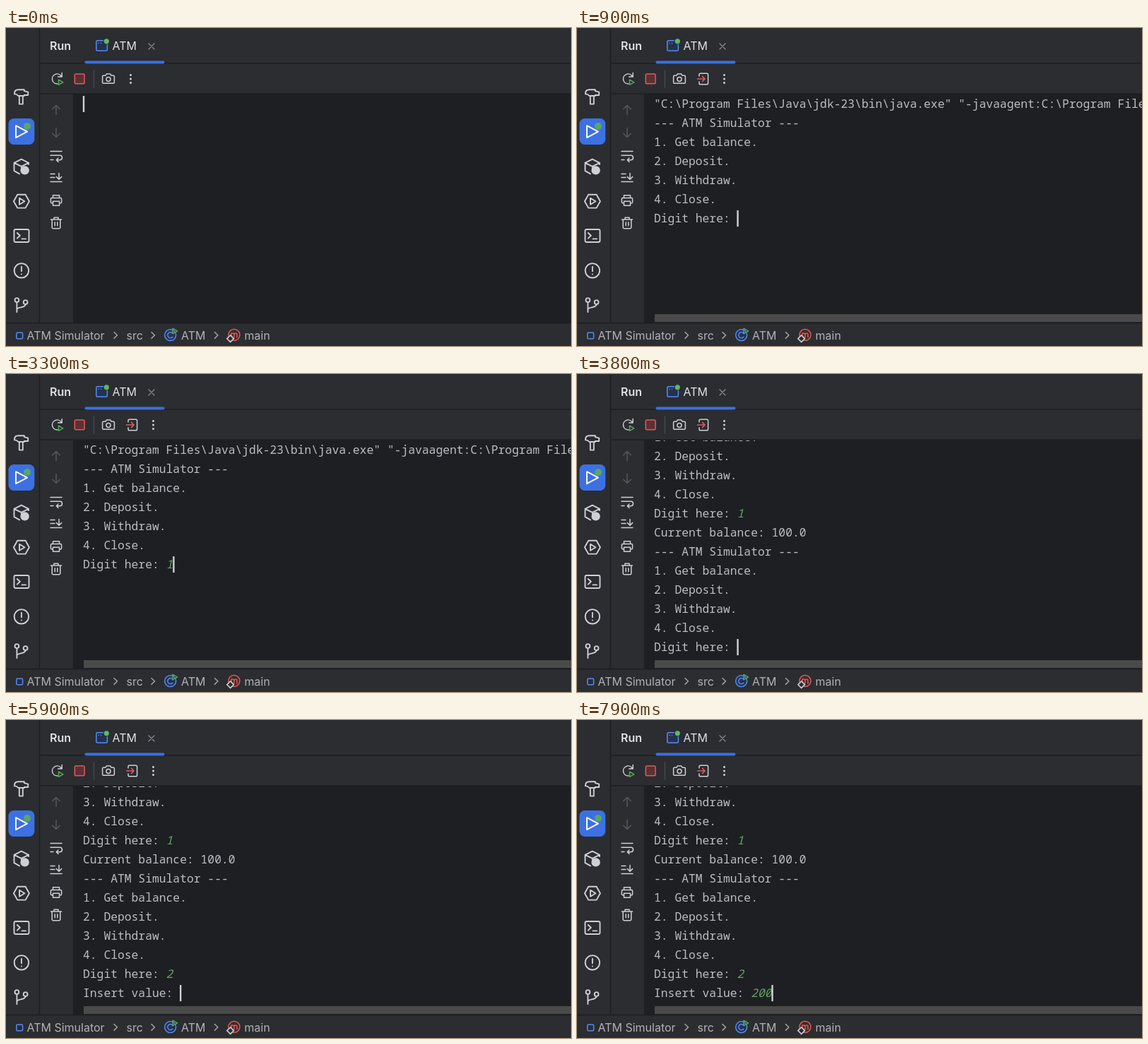
An HTML page that plays this animation: 800 by 450 pixels, repeating every 8 s.

```html
<!DOCTYPE html>
<html lang="en">
<head>
<meta charset="utf-8">
<title>ATM Simulator</title>
<style>
  html, body { margin: 0; width: 100%; height: 100%; overflow: hidden; background: #1e1f22; }
  svg { display: block; width: 100vw; height: 100vh; }
  .ui { font: 16px Inter, sans-serif; fill: #dfe1e5; }
  .crumb { fill: #b0b2b8; }
  #lines { font: 16.33px "Noto Sans Mono", monospace; fill: #bcbec4; white-space: pre; }
  #lines .in { fill: #62a466; font-style: italic; }
  .icon { fill: none; stroke: #ced0d6; stroke-width: 1.9; stroke-linejoin: round; stroke-linecap: round; }
  .thin { stroke-width: 1.5; }
  .dim { stroke: #56585d; }
  .red { stroke: #db5c5c; }
  .blue { stroke: #548af7; }
  .green { stroke: #57a65c; }
</style>
</head>
<body>
<svg viewBox="0 0 800 450">
  <defs>
    <clipPath id="view"><rect x="95" y="94" width="705" height="323"/></clipPath>
  </defs>

  <rect width="800" height="450" fill="#2b2d30"/>
  <rect x="95" y="93" width="705" height="324" fill="#1e1f22"/>
  <path d="M47.5 0V417M48 50H800M48 93H800M0 417.5H800" stroke="#1e1f22" stroke-width="1.4"/>

  <!-- console -->
  <g clip-path="url(#view)">
    <g id="lines"></g>
    <rect id="caret" width="2.4" height="23" fill="#ced0d6"/>
    <rect id="bar" x="110" y="405" width="690" height="11" fill="#4a4a4b"/>
  </g>

  <!-- tab row -->
  <text class="ui" x="62" y="31" font-weight="600" style="font-weight:600">Run</text>
  <g class="icon thin blue">
    <rect x="127.8" y="17.8" width="15.6" height="14.4" rx="2" fill="#25324d"/>
    <path d="M131 21.5h.1M134.5 21.5h.1"/>
  </g>
  <circle cx="142.3" cy="18.8" r="4.6" fill="#2b2d30"/>
  <circle cx="142.3" cy="18.8" r="3.6" fill="#5fb865"/>
  <text class="ui" x="150.5" y="31">ATM</text>
  <path class="icon" style="stroke:#868a91;stroke-width:1.3" d="M202 22l8 8M210 22l-8 8"/>
  <rect x="111.5" y="46.6" width="113" height="3.8" rx="1.9" fill="#3a70e0"/>

  <!-- tool row -->
  <g class="icon thin">
    <path d="M78.4 68.3A7 7 0 1 0 73 79M79.2 63.5V69H73.7"/>
    <path class="green" fill="#253627" d="M74.5 73.2l6.3 3.6-6.3 3.6z"/>
    <rect class="red" x="97.3" y="65" width="13.8" height="13.8" rx="1.8" fill="#5e3034"/>
    <path style="stroke:#46484d" d="M124.5 60V84"/>
    <path d="M138 67.3h2.8l1.6-2.4h5.2l1.6 2.4h2.8a1.4 1.4 0 0 1 1.4 1.4v8.2a1.4 1.4 0 0 1-1.4 1.4h-14a1.4 1.4 0 0 1-1.4-1.4v-8.2a1.4 1.4 0 0 1 1.4-1.4z"/>
    <circle cx="145" cy="72.6" r="3"/>
  </g>
  <g id="exit" class="icon thin">
    <path d="M173 68V66a1.8 1.8 0 0 1 1.8-1.8h9a1.8 1.8 0 0 1 1.8 1.8v12a1.8 1.8 0 0 1-1.8 1.8h-9A1.8 1.8 0 0 1 173 78v-2"/>
    <path class="red" d="M170.5 72H181M177.5 68.4l3.6 3.6-3.6 3.6"/>
  </g>
  <g id="more" fill="#ced0d6">
    <circle cy="66.5" r="1.5"/><circle cy="72" r="1.5"/><circle cy="77.5" r="1.5"/>
  </g>

  <!-- console buttons -->
  <g class="icon thin">
    <path class="dim" d="M71 122.5V109.5M65.7 114.8l5.3-5.3 5.3 5.3"/>
    <path class="dim" d="M71 141.5V154.5M65.7 149.2l5.3 5.3 5.3-5.3"/>
    <path d="M63 174.5H79M63 180.3H76.3a3.2 3.2 0 0 1 0 6.4H71.5M74 184l-2.7 2.7 2.7 2.7M63 186.5H67"/>
    <path d="M63 206.5H69M63 211.5H69M63 217.5H79M75 205.5V214M71.4 210.6l3.6 3.6 3.6-3.6"/>
    <path d="M66.5 240.5V236.8h9V240.5M66.5 247.8H64.8a1.4 1.4 0 0 1-1.4-1.4V242a1.4 1.4 0 0 1 1.4-1.4H77.2a1.4 1.4 0 0 1 1.4 1.4v4.4a1.4 1.4 0 0 1-1.4 1.4H75.5M66.5 245.2h9v6h-9z"/>
    <path d="M63.5 271H78.5M68 271V268.2h6V271M65.2 271V282a1.8 1.8 0 0 0 1.8 1.8h8a1.8 1.8 0 0 0 1.8-1.8V271M69.2 274.8v5M72.8 274.8v5"/>
  </g>

  <!-- side bar -->
  <rect x="3.5" y="128" width="36.8" height="37" rx="7.5" fill="#3d70e2"/>
  <g class="icon">
    <path d="M12 92.4c0-3.4 2.2-5.2 5.6-5.2h8.2v2l5.4 1.4v4.4h-5.4v1H17.4c-1.6-2-3.4-2.6-5.4-2.6zM18.8 96v11.6h5V96"/>
    <path style="stroke:#fff" d="M14 138.2v17l16-8.5z"/>
    <path d="M32 193v-2.2L21.8 185.6 11.5 190.8v11.4L19 206.4M11.5 190.8l10.3 5 10.2-5M21.8 195.8v2.4"/>
    <path d="M16.2 235.8h11.4l5.3 9.4-5.3 9.4H16.2l-5.3-9.4zM19 240.7v9l7.4-4.5z"/>
    <rect x="11.5" y="285" width="21" height="18" rx="2.2"/>
    <path d="M15.8 290l4 3.8-4 3.8M22.5 298.4h5.5"/>
    <circle cx="21.9" cy="343.3" r="10.2"/>
    <path d="M21.9 337.6v6.6M21.9 348.4v.2"/>
    <circle cx="15.4" cy="385" r="2.9"/><circle cx="27.6" cy="388" r="2.9"/>
    <path d="M15.4 388V402M15.4 398.4c0-4.4 12.2-1.6 12.2-7.4"/>
  </g>
  <circle cx="30" cy="139" r="5" fill="#5aa75f"/>
  <circle cx="26.6" cy="201.4" r="6.2" fill="#ced0d6"/>

  <!-- breadcrumbs -->
  <rect class="icon thin blue" x="14.8" y="431" width="8.8" height="8.8" rx="1.6" fill="#25324d"/>
  <g class="ui crumb">
    <text x="29.5" y="440.5">ATM Simulator</text>
    <text x="170.5" y="440.5">src</text>
    <text x="248" y="440.5">ATM</text>
    <text x="337.5" y="440.5">main</text>
  </g>
  <path class="icon thin" style="stroke:#a0a3a9" d="M153 430.5l4.5 4.3-4.5 4.3M206 430.5l4.5 4.3-4.5 4.3M295.5 430.5l4.5 4.3-4.5 4.3"/>
  <g class="icon thin blue">
    <circle cx="232.7" cy="434.6" r="8" fill="#25324d"/>
    <path d="M235.8 437.3a4 4 0 1 1 0-5.4"/>
  </g>
  <path class="icon thin green" fill="#253627" d="M236 425.2l6.6 3.7-6.6 3.7z"/>
  <g class="icon thin red">
    <circle cx="323" cy="434.3" r="8" fill="#402929"/>
    <path d="M319 437.8v-5.8M319 434c0-2.6 4-2.6 4 0v3.8M323 434c0-2.6 4-2.6 4 0v3.8"/>
  </g>
  <path d="M317.7 434.8l4.8 4.8-4.8 4.8-4.8-4.8z" fill="#2b2d30" stroke="#ced0d6" stroke-width="1.6"/>

  <path id="mouse" d="M-4.5 -9.5H-1.5L0 -8.5 1.5 -9.5H4.5M0 -8.5V8.5M-4.5 9.5H-1.5L0 8.5 1.5 9.5H4.5" fill="none" stroke="#e4e4e4" stroke-width="1.5"/>
</svg>
<script>
const LOOP = 8000, LEFT = 109, CELL = 9.8, ROW = 27, BASE = 113, MAX_BASE = 392;
const $ = id => document.getElementById(id);

const command = '"C:\\Program Files\\Java\\jdk-23\\bin\\java.exe" "-javaagent:C:\\Program Files\\JetBrains';
const menu = ['--- ATM Simulator ---', '1. Get balance.', '2. Deposit.', '3. Withdraw.', '4. Close.', 'Digit here: '];

// time, printed rows, typed text; typing joins the last row
const events = [
  { at: 300, rows: [command] },
  { at: 400, rows: menu },
  { at: 2700, key: '1' },
  { at: 3500, rows: ['Current balance: 100.0', ...menu] },
  { at: 5600, key: '2' },
  { at: 5900, rows: ['Insert value: '] },
  { at: 7500, key: '2' },
  { at: 7700, key: '0' },
  { at: 7900, key: '0' }
];
const mouseIn = 1400, mouseRest = 2000, mouseOut = 2700;

function consoleAt(t) {
  const rows = [];
  for (const e of events) {
    if (t < e.at) break;
    if (e.key) rows[rows.length - 1].typed += e.key;
    else rows.push(...e.rows.map(text => ({ text, typed: '' })));
  }
  return rows;
}

function addText(x, y, text, cls) {
  const el = document.createElementNS('http://www.w3.org/2000/svg', 'text');
  el.setAttribute('x', x);
  el.setAttribute('y', y);
  if (cls) el.setAttribute('class', cls);
  el.textContent = text;
  $('lines').append(el);
}

function drawConsole(t) {
  const rows = consoleAt(t);
  const last = Math.max(0, rows.length - 1);
  const scroll = Math.max(0, BASE + last * ROW - MAX_BASE);
  const rowY = i => BASE + i * ROW - scroll;
  $('lines').textContent = '';
  rows.forEach((r, i) => {
    if (rowY(i) < 85) return;
    addText(LEFT, rowY(i), r.text);
    if (r.typed) addText(LEFT + r.text.length * CELL, rowY(i), r.typed, 'in');
  });
  // the command row is closed by a line break
  const open = rows.length > 1 ? rows[last] : null;
  const column = open ? open.text.length + open.typed.length : 0;
  const caretRow = rows.length === 1 ? 1 : last;
  $('caret').setAttribute('x', LEFT + column * CELL - 0.2);
  $('caret').setAttribute('y', rowY(caretRow) - 17);
}

function drawMouse(t) {
  const p = Math.min(1, Math.max(0, (t - mouseIn) / (mouseRest - mouseIn)));
  const rest = (1 - p) ** 3;
  $('mouse').setAttribute('transform', `translate(${487 + 150 * rest} ${278 + 120 * rest})`);
  $('mouse').style.display = t >= mouseIn && t < mouseOut ? '' : 'none';
}

function draw(t) {
  const running = t >= events[0].at;
  drawConsole(t);
  drawMouse(t);
  $('exit').style.display = $('bar').style.display = running ? '' : 'none';
  $('more').setAttribute('transform', `translate(${running ? 208.5 : 176.5} 0)`);
}

const start = performance.now();
let shown = -1;
function tick() {
  const t = Math.floor((performance.now() - start) % LOOP / 100) * 100;
  if (t !== shown) draw(shown = t);
  requestAnimationFrame(tick);
}
tick();
</script>
</body>
</html>
```
